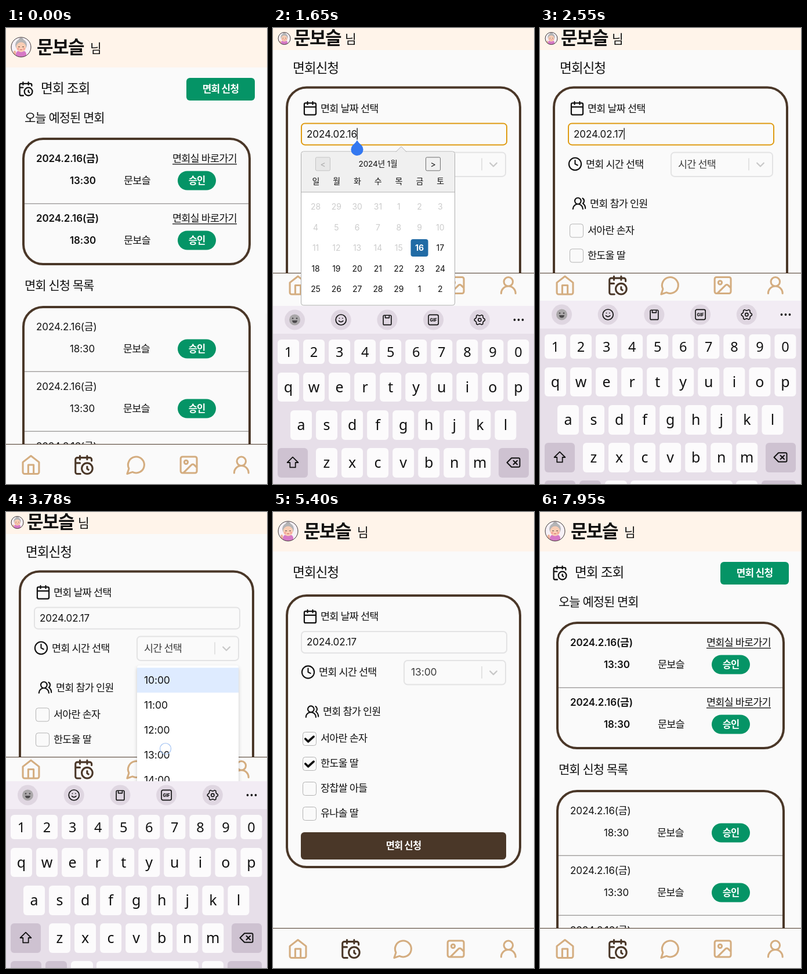
An HTML page with a canvas that plays this animation: 450 by 786 pixels, repeating every 8820 ms.

```html
<!DOCTYPE html>
<html lang="ko">
<head>
<meta charset="utf-8">
<title>면회 신청</title>
<style>
html, body { margin: 0; width: 100%; height: 100%; overflow: hidden; background: #fafafa; }
canvas { display: block; }
</style>
</head>
<body>
<canvas id="stage" width="450" height="786"></canvas>
<script>
const ctx = document.getElementById('stage').getContext('2d');
const LOOP = 8820;
const BROWN = '#4a3728', TAN = '#d4ad80', GREEN = '#059466', PAPER = '#fafafa', INK = '#111', LINE = '#e3e3e4';
const UI_FONT = 'Inter, "Noto Sans CJK KR", sans-serif';
const KEY_FONT = '"Noto Sans", "Open Sans", sans-serif';
const RESIDENT = '문보슬';
const VISITORS = ['서아란 손자', '한도울 딸', '장찹쌀 아들', '유나솔 딸'];

const ring = (x, y, r) => `M${x - r} ${y}a${r} ${r} 0 1 0 ${2 * r} 0a${r} ${r} 0 1 0 ${-2 * r} 0z`;
const ICONS = {
  home: 'M3 9l9-7 9 7v11a2 2 0 0 1-2 2H5a2 2 0 0 1-2-2zM9 22V12h6v10',
  visit: 'M21 7.5V6a2 2 0 0 0-2-2H5a2 2 0 0 0-2 2v14a2 2 0 0 0 2 2h3.5M16 2v4M8 2v4M3 10h5M17.5 17.5L16 16.3V14' + ring(16, 16, 6),
  chat: 'M7.9 20A9 9 0 1 0 4 16.1L2 22Z',
  image: 'M5 3h14a2 2 0 0 1 2 2v14a2 2 0 0 1-2 2H5a2 2 0 0 1-2-2V5a2 2 0 0 1 2-2zM21 15l-3.1-3.1a2 2 0 0 0-2.8 0L6 21' + ring(9, 9, 2),
  user: ring(12, 8, 5) + 'M20 21a8 8 0 0 0-16 0',
  users: 'M18 21a8 8 0 0 0-16 0' + ring(10, 8, 5) + 'M22 20c0-3.37-2-6.5-4-8a5 5 0 0 0-.45-8.3',
  calendar: 'M5 4h14a2 2 0 0 1 2 2v14a2 2 0 0 1-2 2H5a2 2 0 0 1-2-2V6a2 2 0 0 1 2-2zM16 2v4M8 2v4M3 10h18',
  clock: ring(12, 12, 10) + 'M12 6v6l4 2',
  chevron: 'M6.5 9.5l5.5 5.5 5.5-5.5',
  check: 'M5 12l5 5 10-9',
  smile: ring(12, 12, 10) + 'M8 14s1.5 2 4 2 4-2 4-2M9 9h.01M15 9h.01',
  clipboard: 'M6 3h12a2 2 0 0 1 2 2v15a2 2 0 0 1-2 2H6a2 2 0 0 1-2-2V5a2 2 0 0 1 2-2zM8 3v5h8V3',
  frame: 'M5 2h14a3 3 0 0 1 3 3v14a3 3 0 0 1-3 3H5a3 3 0 0 1-3-3V5a3 3 0 0 1 3-3z',
  shift: 'M12 2l10 10h-5v9H7v-9H2z',
  erase: 'M9 5h11a2 2 0 0 1 2 2v10a2 2 0 0 1-2 2H9l-7-7zM12 9l6 6M18 9l-6 6',
  gear: gearPath()
};

function gearPath() {
  let path = '';
  for (let i = 0; i < 24; i++) {
    const angle = (i - 0.5) * Math.PI / 12, r = i % 4 < 2 ? 10.3 : 8.2;
    path += `${i ? 'L' : 'M'}${12 + r * Math.cos(angle)} ${12 + r * Math.sin(angle)}`;
  }
  return path + 'z' + ring(12, 12, 3);
}

function icon(name, x, y, scale, color = INK, width = 2) {
  ctx.save();
  ctx.translate(x, y);
  ctx.scale(scale, scale);
  ctx.translate(-12, -12);
  ctx.strokeStyle = color;
  ctx.lineWidth = width;
  ctx.lineCap = ctx.lineJoin = 'round';
  ctx.stroke(new Path2D(ICONS[name]));
  ctx.restore();
}

// y is the vertical centre of the glyphs
function text(str, x, y, size = 17.5, { weight = 400, color = INK, align = 'left' } = {}) {
  ctx.font = `${weight} ${size}px ${UI_FONT}`;
  ctx.letterSpacing = (/^[가-힣]/.test(str) ? -0.05 : -0.006) * size + 'px';
  ctx.textAlign = align;
  ctx.fillStyle = color;
  ctx.fillText(str, x, y + size * 0.37);
}

function rect(x, y, w, h, color) {
  ctx.fillStyle = color;
  ctx.fillRect(x, y, w, h);
}

function box(x, y, w, h, r, fill, stroke, width = 1) {
  ctx.beginPath();
  ctx.roundRect(x, y, w, h, r);
  if (fill) { ctx.fillStyle = fill; ctx.fill(); }
  if (stroke) { ctx.strokeStyle = stroke; ctx.lineWidth = width; ctx.stroke(); }
}

function disc(x, y, r, fill) {
  ctx.beginPath();
  ctx.arc(x, y, r, 0, 7);
  ctx.fillStyle = fill;
  ctx.fill();
}

function avatar(x, y, r) {
  ctx.save();
  ctx.translate(x, y);
  ctx.scale(r / 17, r / 17);
  disc(0, 0, 17, '#f6f1f7');
  ctx.clip();
  box(-9, 6, 18, 14, 6, '#d679c6');
  box(-13, 6, 4, 9, 2, '#eeb39c');
  disc(0, -12, 4, '#a9a9ab');
  disc(0, -4, 10, '#b4b4b6');
  disc(0, 0, 8.5, '#f9cdb4');
  disc(-5, 3, 1.8, '#f2a196');
  disc(5, 3, 1.8, '#f2a196');
  rect(-5, -1, 3, 1, '#564440');
  rect(2, -1, 3, 1, '#564440');
  rect(-2, 4, 4, 1, '#c9605c');
  ctx.restore();
  ctx.beginPath();
  ctx.arc(x, y, r, 0, 7);
  ctx.strokeStyle = '#3b3234';
  ctx.lineWidth = 1;
  ctx.stroke();
}

function header(compact) {
  rect(0, 0, 450, compact ? 38 : 68, '#fff4ea');
  if (compact) avatar(19.5, 18, 10.5); else avatar(26, 33, 17);
  const [x, y] = compact ? [36, 17] : [53, 33];
  text(RESIDENT, x, y, 31, { weight: 700 });
  text('님', x + (compact ? 88 : 92), y + 2, 21.5);
}

function navBar(compact) {
  const top = compact ? 422 : 717;
  rect(0, top, 450, 786 - top, PAPER);
  rect(0, top, 450, 1, BROWN);
  ['home', 'visit', 'chat', 'image', 'user'].forEach((name, i) =>
    icon(name, 43 + 90.7 * i, top + (compact ? 21.5 : 36), 1.55, i === 1 ? BROWN : TAN));
}

function visitRow(y, time, nameX, weight) {
  text('2024.2.16(금)', 52, y, 17, { weight });
  text(time, 110, y + 38, 17, { weight });
  text(RESIDENT, nameX, y + 38);
  box(296, y + 21.5, 66, 33, 16.5, GREEN);
  text('승인', 329, y + 38, 16.5, { weight: 700, color: '#fff', align: 'center' });
}

function listPage(loaded) {
  icon('visit', 34, 105, 1.15);
  text('면회 조회', 60, 104, 22.7);
  box(311, 86, 118, 39, 6, GREEN);
  text('면회 신청', 370, 105, 17, { weight: 700, color: '#fff', align: 'center' });
  text('오늘 예정된 면회', 32, 154, 21);
  const firstHeight = loaded ? 216 : 72, shift = firstHeight - 216;
  text('면회 신청 목록', 32, 443 + shift, 21);
  box(30, 191, 390, firstHeight, 34, PAPER, BROWN, 4);
  box(30, 481 + shift, 390, loaded ? 400 : 72, 34, PAPER, BROWN, 4);
  if (!loaded) return;
  ['13:30', '18:30'].forEach((time, i) => {
    const y = 225 + 103 * i;
    visitRow(y, time, 203, 600);
    text('면회실 바로가기', 287, y, 17.5);
    rect(287, y + 9, 111, 1.3, INK);
  });
  ['18:30', '13:30', '18:30'].forEach((time, i) => visitRow(515 + 103 * i, time, 202, 400));
  for (const y of [302, 591.5, 694.5]) rect(32, y, 386, 1.5, '#a5a3a2');
}

function formPage(s) {
  text('면회신청', 34, s.compact ? 69 : 104, 22.7);
  ctx.save();
  ctx.translate(0, s.lift);
  const missing = s.visitors ? 0 : 172;
  box(24, 144, 402, 468 - missing, 34, PAPER, BROWN, 4);

  icon('calendar', 64, 180, 1.12);
  text('면회 날짜 선택', 82, 180);
  box(49, 206, 354, 37, 6, PAPER, s.dateFocus ? '#df9b12' : LINE, 2);
  text(s.date, 58, 224, 17);
  if (s.dateFocus) rect(144.5, 214, 1.3, 20, INK);

  icon('clock', 60.5, 276, 1.06);
  text('면회 시간 선택', 79, 276);
  box(226, 256, 175, 41.5, 6, PAPER, LINE, 2);
  text(s.time, 238, 276, 17.5, { color: '#3d3d3d' });
  rect(359.5, 266, 1, 21, '#ccc');
  icon('chevron', 380, 277, 1.05, '#c8c8c8', 2.2);

  icon('users', 67.5, 344, 1.07);
  text('면회 참가 인원', 86, 344);
  if (s.visitors) VISITORS.forEach((label, i) => {
    const y = 391 + 43 * i;
    box(51.5, y - 11.5, 23, 23, 4, PAPER, '#b3b3b3');
    if (i < s.checked) icon('check', 62.5, y, 0.95, INK, 4);
    text(label, 82, y - 1);
  });
  box(48, 552 - missing, 354, 47, 6, BROWN);
  text('면회 신청', 225, 575 - missing, 16.5, { weight: 700, color: '#fff', align: 'center' });
  ctx.restore();
}

function calendarPopup() {
  const center = { align: 'center' };
  box(48.5, 254.5, 265, 265, 4, '#fff', '#aeaeae');
  box(49, 255, 264, 69, [4, 4, 0, 0], '#f0f0f0');
  rect(49, 324, 264, 1, '#aeaeae');
  ctx.beginPath();
  ctx.moveTo(212, 255); ctx.lineTo(221, 246); ctx.lineTo(230, 255);
  ctx.fillStyle = '#f0f0f0';
  ctx.fill();
  ctx.strokeStyle = '#aeaeae';
  ctx.stroke();
  box(73.5, 264.5, 25, 23, 2, '#e7e7e7', '#c4c4c4');
  box(263.5, 264.5, 25, 23, 2, '#f0f0f0', '#6d6d6d');
  text('<', 86, 276, 14, { align: 'center', color: '#aaa' });
  text('>', 276, 276, 14, center);
  text('2024년 1월', 181, 275.5, 13.5, center);
  [...'일월화수목금토'].forEach((day, i) => text(day, 73.5 + 35.8 * i, 305, 14, center));
  for (let n = 0; n < 35; n++) {
    const x = 73.5 + 35.8 * (n % 7), y = 349.5 + 35.6 * Math.floor(n / 7);
    const day = n < 4 ? 28 + n : (n - 4) % 29 + 1, selected = n === 19;
    if (selected) box(x - 15, y - 15, 30, 30, 4, '#216ba5');
    text(String(day), x, y, 14, {
      align: 'center', weight: selected ? 700 : 400,
      color: selected ? '#fff' : n < 19 ? '#ccc' : INK
    });
  }
}

function caretHandle() {
  ctx.beginPath();
  ctx.moveTo(145, 235);
  ctx.quadraticCurveTo(148, 240, 152.5, 243.5);
  ctx.arc(145, 251, 10.6, -0.78, Math.PI + 0.78);
  ctx.quadraticCurveTo(142, 240, 145, 235);
  ctx.fillStyle = '#3478f0';
  ctx.fill();
}

function timeMenu() {
  ctx.save();
  ctx.shadowColor = 'rgba(0,0,0,.2)';
  ctx.shadowBlur = 6;
  ctx.shadowOffsetY = 3;
  box(226, 306, 175, 340, 4, '#fff');
  ctx.restore();
  rect(226, 310, 175, 43, '#deebff');
  for (let i = 0; i < 7; i++) text(`${10 + i}:00`, 238, 331.5 + 43 * i, 17.5);
}

function keyboard(top) {
  const LIGHT = '#fcfbfc', DARK = '#cec2d1', SOFT = '#4a484a';
  const key = (x, y, w, h, fill = LIGHT) => box(x, y, w, h, 6, fill);
  const letters = (chars, x, y, h, size, base) => [...chars].forEach((char, i) => {
    key(x + 44.05 * i, y, 37, h);
    ctx.font = `${size}px ${KEY_FONT}`;
    ctx.letterSpacing = '0px';
    ctx.textAlign = 'center';
    ctx.fillStyle = INK;
    ctx.fillText(char, x + 18.5 + 44.05 * i, y + base);
  });
  ctx.save();
  ctx.translate(0, top);
  rect(0, 0, 450, 786, '#e7dfe9');
  rect(0, 0, 450, 48, '#f2ecf4');
  for (let i = 0; i < 5; i++) disc(37.5 + 79.7 * i, 24, 17.5, '#dfd6e1');
  disc(37.5, 24, 9.5, '#aaa7a9');
  disc(34, 21.5, 1.3, SOFT);
  disc(41, 21.5, 1.3, SOFT);
  ctx.beginPath();
  ctx.arc(37.5, 25, 4.5, 0, Math.PI);
  ctx.fillStyle = SOFT;
  ctx.fill();
  icon('smile', 117.2, 24, 0.9, INK, 1.9);
  icon('clipboard', 197, 24, 0.86, INK, 1.9);
  icon('frame', 276.6, 24, 0.86, INK, 1.9);
  text('GIF', 276.6, 24, 7.5, { weight: 800, align: 'center' });
  icon('gear', 356.3, 24, 0.88, INK, 1.8);
  for (const x of [416.5, 423.5, 430.5]) disc(x, 24, 1.9, INK);

  letters('1234567890', 8, 58, 42, 23.5, 30);
  letters('qwertyuiop', 8, 115, 50, 25, 34);
  letters('asdfghjkl', 30, 180, 51, 25, 34);
  letters('zxcvbnm', 74, 245, 51, 25, 34);
  key(8, 245, 52, 51, DARK);
  icon('shift', 34, 270, 0.94, INK, 1.9);
  key(389, 245, 52, 51, DARK);
  icon('erase', 414.5, 270, 1.1, INK, 1.8);
  for (const [x, w, fill] of [[8, 53, DARK], [68, 37, DARK], [112, 38], [156, 176], [338, 37], [382, 59, DARK]])
    key(x, 310, w, 51, fill);
  ctx.restore();
}

const KEYBOARD_UP = 464, KEYBOARD_DOWN = 786;
const KEYBOARD_MOVES = [[1440, 1740, true], [2100, 2310, false], [2310, 2610, true], [3880, 4110, false]];

function keyboardTop(t) {
  const move = KEYBOARD_MOVES.findLast(([start]) => t >= start);
  if (!move) return KEYBOARD_DOWN;
  const [start, end, opening] = move;
  const p = Math.min(1, (t - start) / (end - start));
  const hidden = opening ? (1 - p) ** 2.5 : p ** 2.34;
  return Math.round(KEYBOARD_UP + (KEYBOARD_DOWN - KEYBOARD_UP) * hidden);
}

const TAPS = [
  [120, 370, 105], [1080, 315, 220], [2040, 288, 379], [2850, 300, 235],
  [3780, 275, 408], [4590, 135, 392], [5130, 137, 431], [7500, 225, 575]
];

function touches(t) {
  for (const [start, x, y] of TAPS) {
    const age = t - start;
    if (age < 0 || age >= 245) continue;
    ctx.globalAlpha = Math.min(1, (245 - age) / 145);
    ctx.beginPath();
    ctx.arc(x, y, 9.5, 0, 7);
    ctx.strokeStyle = '#a3c3f3';
    ctx.lineWidth = 1.2;
    ctx.stroke();
    ctx.globalAlpha = 1;
  }
}

function draw(t) {
  const within = (start, end) => t >= start && t < end;
  const compact = within(1590, 2110) || within(2460, 3880);
  const state = {
    compact,
    lift: compact ? -41.6 : 0,
    visitors: t >= 570,
    dateFocus: within(1170, 2940),
    date: t < 2110 ? '2024.02.16' : '2024.02.17',
    time: t < 3870 ? '시간 선택' : '13:00',
    checked: (t >= 4680) + (t >= 5220)
  };
  rect(0, 0, 450, 786, PAPER);
  if (within(240, 7600)) formPage(state); else listPage(t < 240 || t >= 7950);
  rect(448, 492, 1, 220, '#f2f2f2');
  header(compact);
  navBar(compact);

  ctx.save();
  ctx.translate(0, state.lift);
  if (within(1170, 2110)) calendarPopup();
  if (within(1440, 2110)) caretHandle();
  if (within(2940, 3870)) timeMenu();
  ctx.restore();

  const top = keyboardTop(t);
  if (top < KEYBOARD_DOWN) keyboard(top);
  touches(t);
}

function tick() {
  draw(performance.now() % LOOP);
  requestAnimationFrame(tick);
}
tick();
</script>
</body>
</html>
```
